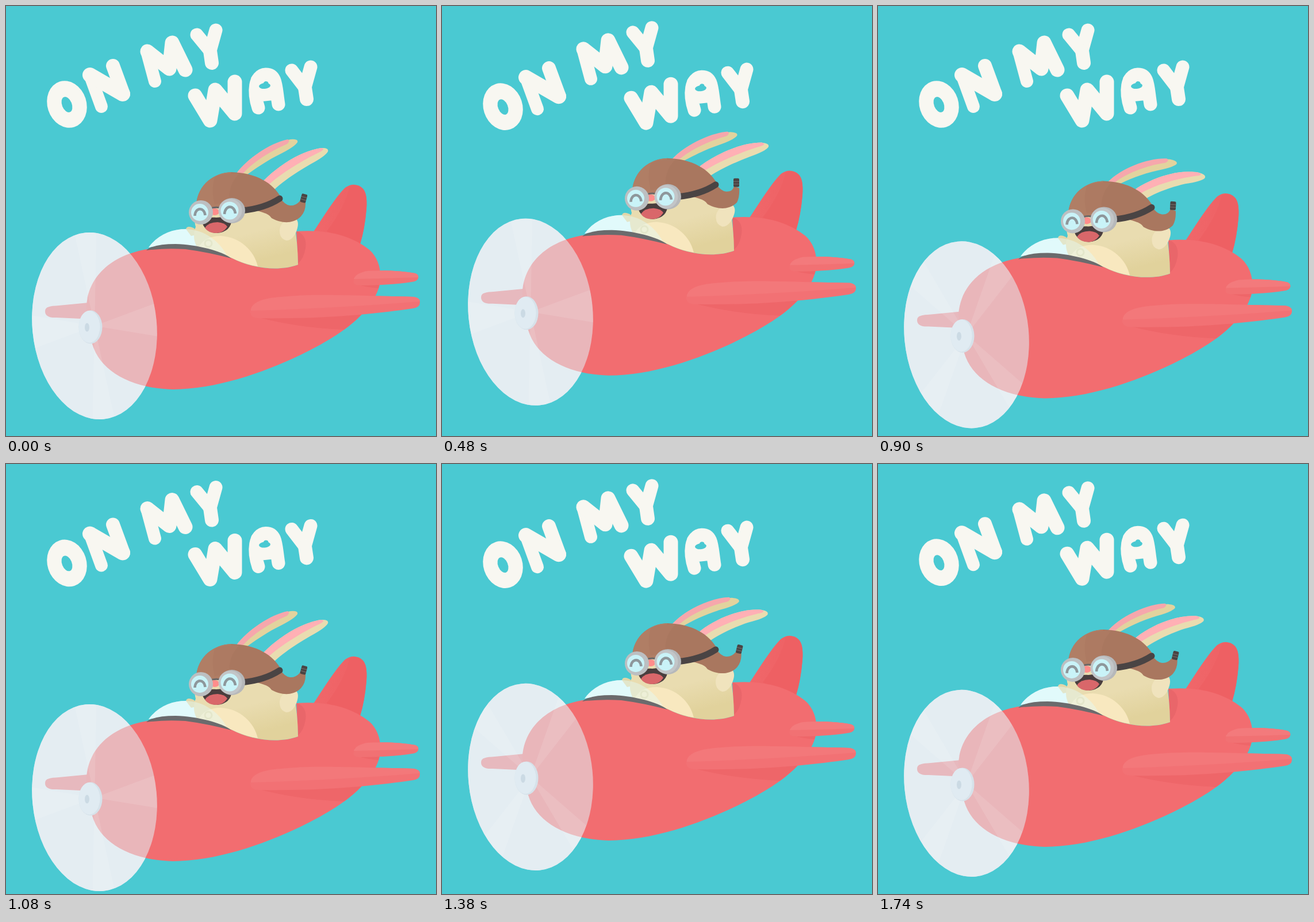
Recreate the animation shown at these times as an HTML page. Size 748x748 px, loop 1800 ms.

```html
<!DOCTYPE html>
<html lang="en">
<head>
<meta charset="utf-8">
<title>On my way</title>
<style>
html, body { margin: 0; width: 100%; height: 100%; overflow: hidden; background: #4ac9d2; }
svg { display: block; width: 100vw; height: 100vh; }
.word { fill: none; stroke: #f8f7f1; stroke-linecap: round; stroke-linejoin: round; }
.solid { fill: #f8f7f1; stroke: none; }
.hole { fill: #4ac9d2; stroke: none; }
</style>
</head>
<body>
<svg viewBox="0 0 748 748" role="img" aria-label="ON MY WAY">
  <defs>
    <linearGradient id="fur" x1="0" y1="0" x2=".35" y2="1">
      <stop offset=".65" stop-color="#e9dcb0"/><stop offset="1" stop-color="#e1d29c"/>
    </linearGradient>
    <linearGradient id="fin" x1="0" x2="1">
      <stop offset="0" stop-color="#f0676a"/><stop offset="1" stop-color="#ee6063"/>
    </linearGradient>
    <path id="dome" d="M248 420C264 398 288 388 313 388C345 389 370 408 384 433Q310 408 248 420Z"/>
  </defs>

  <g class="word">
    <g id="down">
      <ellipse class="solid" cx="106" cy="171" rx="34" ry="41.5" transform="rotate(-18 106 171)"/>
      <ellipse class="hole" cx="106" cy="171.5" rx="8.5" ry="14" transform="rotate(-22 106 171.5)"/>
      <path d="M146 120L166 175" stroke-width="22"/>
      <path d="M146 120L203 153" stroke-width="26"/>
      <path d="M186 104L204 153" stroke-width="24"/>
      <path d="M329 156L355 199L364 146L398 187L398 132" stroke-width="25"/>
      <path d="M439 177C430 150 432 120 452 119C471 119 469 140 474 171M440 155L468 152" stroke-width="23"/>
      <path d="M436 128Q452 114 467 128" stroke-width="20"/>
      <ellipse class="hole" cx="450" cy="139" rx="10" ry="5" transform="rotate(-6 450 139)"/>
      <path d="M497 112L520 142L530 106" stroke-width="23"/>
      <path d="M520 142L523 162" stroke-width="24"/>
    </g>
    <g id="up">
      <path d="M245 79L259 131" stroke-width="22"/>
      <path d="M246 79L284 109L289 64L312 111" stroke-width="25"/>
      <path d="M332 50L355 78L365 42" stroke-width="23"/>
      <path d="M355 78L358 99" stroke-width="24"/>
    </g>
  </g>

  <g id="plane">
    <ellipse cx="154" cy="556.5" rx="108.2" ry="163" transform="rotate(-5.5 154 556.5)" fill="#e6eef3"/>
    <path fill="url(#fin)" d="M534 394C556 360 577 328 590 316Q606 305 620 317Q629 325 627 353Q624 388 616 414Z"/>
    <path fill="#ee6063" d="M558 392Q590 350 598 314Q612 309 620 317Q629 325 627 353Q624 388 616 414Z"/>
    <path fill="#ee7479" d="M68 531C68 523 76 522 92 521L144 516L152 545L88 542Q68 543 68 531Z"/>
    <path fill="#f26d70" d="M140 522C142 478 176 430 260 421C318 418 360 427 392 438C428 457 475 462 508 450L505 392C560 388 602 400 632 424C650 440 654 465 650 485C643 512 623 536 595 558C545 597 405 667 290 667C212 665 158 631 148 580Q141 550 140 522Z"/>
    <path fill="#e9666a" d="M506 392Q524 398 521 421Q518 440 508 448Z"/>
    <path fill="#ee6669" d="M440 542Q510 560 588 563Q606 550 618 537ZM612 485Q632 490 648 491L650 482Z"/>
    <path fill="#f17173" d="M605 477Q606 466 628 461C660 459 690 461 712 465Q719 468 717 474Q715 479 706 480C680 484 645 486 617 486Q602 486 605 477Z"/>
    <path fill="#f37a7c" d="M605 475Q608 465 628 461C660 459 690 461 712 465Q718 467 717 472Q660 474 605 475Z"/>
    <path fill="#f27174" d="M425 533Q424 515 460 508C520 500 570 503 710 506Q721 509 720 516Q720 524 708 526C640 536 550 545 440 543Q426 543 425 533Z"/>
    <path fill="#f3787a" d="M426 527Q430 513 460 508C520 500 570 503 710 506Q720 508 720 514Q570 526 426 530Z"/>

    <use href="#dome" fill="#e1f9fa"/>

    <path class="ear" fill="#e2d39e"/>
    <path class="ear" fill="#f6a7ac"/>
    <path class="ear" fill="#e9dcb0"/>
    <path class="ear" fill="#ffb0b5"/>

    <path fill="#e2d6a9" d="M313 388Q315 381 326 386L340 396L322 400Z"/>
    <path fill="url(#fur)" d="M331 345Q326 372 330 384Q322 405 335 424L392 438C428 457 475 462 508 450Q508 414 500 368L460 320L350 320Z"/>
    <path fill="#f8e8bf" d="M334 422Q344 400 374 400C408 402 432 426 438 453Q414 449 392 438Q365 428 334 422Z"/>
    <circle cx="352" cy="413" r="6" fill="none" stroke="#e6d8a8" stroke-width="3"/>
    <path id="paw" fill="#f0e3bd" d="M476 391C476 380 486 370 496 368C506 367 510 375 507 386C504 398 497 408 488 408Q476 405 476 391Z"/>

    <path id="tail" fill="#a9775f"/>
    <g id="buckle" fill="#4a4444">
      <rect x="513" y="327" width="10" height="15" rx="2"/>
      <path d="M513 332.500H523M513 337H523" stroke="#77706e" stroke-width="1"/>
    </g>
    <path fill="#a9775f" d="M331 345C334 310 362 290 392 289C435 290 465 308 479 334Q450 353 412 357L390 345Z"/>
    <path fill="#b07e65" d="M331 345C334 310 362 290 392 289Q386 312 389 340L370 352Z"/>
    <path fill="#ad7a62" d="M363 298Q376 290 406 291Q386 312 389 340L363 345Q356 320 363 298Z"/>
    <path d="M410 356Q450 352 476 335" fill="none" stroke="#4a4444" stroke-width="11" stroke-linecap="round"/>

    <path fill="#4a3e3e" d="M340 373Q352 367 366 368Q382 366 393 369Q392 393 367 395Q345 394 340 373Z"/>
    <path fill="#d9676a" d="M346 386Q352 376 368 376Q381 377 385 384Q378 395 366 395Q352 395 346 386Z"/>
    <path d="M356 352Q364 349 373 351" fill="none" stroke="#6b6666" stroke-width="3"/>
    <ellipse cx="363" cy="358" rx="8" ry="6" fill="#ff8d8b"/>
    <circle cx="339" cy="359" r="21" fill="#bcbfc1"/>
    <ellipse cx="393" cy="356" rx="23" ry="22" fill="#b6b8ba"/>
    <circle cx="390" cy="356" r="20.500" fill="#c2c5c7"/>
    <g fill="#c9f3f8">
      <circle cx="337" cy="359" r="15"/>
      <circle cx="389" cy="356" r="15.500"/>
    </g>
    <path d="M328.500 365C329 350 345 349 346.500 364M380 362C381 346 397 345 399 361" fill="none" stroke="#8e979b" stroke-width="4.500"/>

    <use href="#dome" fill="#e1f9fa" opacity=".42"/>
    <path fill="#6b6b6d" d="M244 425Q256 414 295 414C332 415 376 426 392 439Q350 428 312 423Q275 421 244 425Z"/>

    <g transform="translate(154 556.5) rotate(-5.5) scale(108.200 163)">
      <circle r="1" fill="#e3edf2" opacity=".57"/>
      <g id="streaks" fill="#fff" opacity=".11"></g>
    </g>
    <ellipse cx="147" cy="558.500" rx="20.500" ry="29" fill="#d6e2ea"/>
    <ellipse cx="145" cy="558" rx="18.500" ry="28" fill="#e0ebf2"/>
    <ellipse cx="141" cy="559" rx="4" ry="7.500" fill="#cbdae4"/>
  </g>
</svg>
<script>
const $ = id => document.getElementById(id);
const FRAME = 60, FRAMES = 30;
const heights = [0, -30, 0, 24, -15, 0];
const slopes = [0, 0, 27, 0, 0, 0];
// Six-step flutter, repeated five times per loop
const earTurn = [0, 4, 9, 10, 10, 6];
const earBend = [0, -1, 0, 6, 10, 5];
const sway = [0, .5, 1, .8, .4, .1];

const farEar = { x: 410, y: 291, length: 111, gain: .82, stretch: .004 };
const nearEar = { x: 458, y: 310, length: 118, gain: 1, stretch: -.005 };
const ears = [
  [farEar, "M395 300L401 291C420 265 460 238 495 232Q509 231 507 237Q503 244 480 256C455 268 432 284 417 295L408 306Z"],
  [farEar, "M395 300L401 291C420 265 460 238 490 232Q495 234 489 240C460 252 425 275 411 293L404 302Z"],
  [nearEar, "M442 312L449 303C475 277 514 252 548 247Q562 246 560 253Q556 261 530 275C507 288 482 305 467 319L458 328Z"],
  [nearEar, "M442 312L449 303C475 277 514 252 548 247Q556 248 548 253C520 266 480 290 458 310L450 320Z"]
];
const earPaths = document.querySelectorAll(".ear");

const [wx, wy] = [Math.cos(Math.PI / 18), Math.sin(Math.PI / 18)];
$("streaks").innerHTML = [0, 90, 180, 270].map(a =>
  `<path transform="rotate(${a})" d="M0 0L${wx} ${-wy}A1 1 0 0 1 ${wx} ${wy}Z"/>`).join("");

function planeHeight(frame) {
  const i = Math.floor(frame / 6), u = frame / 6 - i, v = 1 - u;
  return heights[i] * v * v * (1 + 2 * u) + heights[i + 1] * u * u * (3 - 2 * u)
    + slopes[i] * u * v * v - slopes[i + 1] * u * u * v;
}

function bendEar({ x, y, length, gain, stretch }, path, turn, bend) {
  return path.replace(/([\d.]+) ([\d.]+)/g, (_, px, py) => {
    const dx = px - x, dy = py - y, s = Math.min(1, Math.hypot(dx, dy) / length);
    const a = (turn + bend * s) * gain * Math.PI / 180;
    const k = 1 + stretch * bend * s, c = Math.cos(a) * k, n = Math.sin(a) * k;
    return `${(x + dx * c - dy * n).toFixed(2)} ${(y + dx * n + dy * c).toFixed(2)}`;
  });
}

function draw(frame) {
  const step = frame % 6, w = sway[step];
  const drift = 2.1 * (1 - Math.cos(frame / 15 * 2 * Math.PI));
  $("down").setAttribute("transform", `translate(0 ${drift})`);
  $("up").setAttribute("transform", `translate(0 ${-drift})`);
  $("plane").setAttribute("transform", `translate(0 ${planeHeight(frame)})`);
  $("streaks").setAttribute("transform", `rotate(${45 * (frame % 2)})`);
  ears.forEach(([ear, path], i) =>
    earPaths[i].setAttribute("d", bendEar(ear, path, earTurn[step], earBend[step])));
  $("paw").setAttribute("transform", `rotate(${4 * w} 488 400)`);
  const tip = 521 - 4 * w;
  $("tail").setAttribute("d", `M430 354C448 360 456 360 462 369C478 378 500 380 513 366Q${tip + 1} 356 ${tip} 341L${tip - 9} 338Q505 348 494 347Q485 346 477 334Z`);
  $("buckle").setAttribute("transform", `translate(${-6 * w} ${-3 * w}) rotate(${15 - 15 * w} 518 334)`);
}

function tick(now) {
  draw(Math.floor(now / FRAME) % FRAMES);
  requestAnimationFrame(tick);
}
draw(0);
requestAnimationFrame(tick);
</script>
</body>
</html>
```
